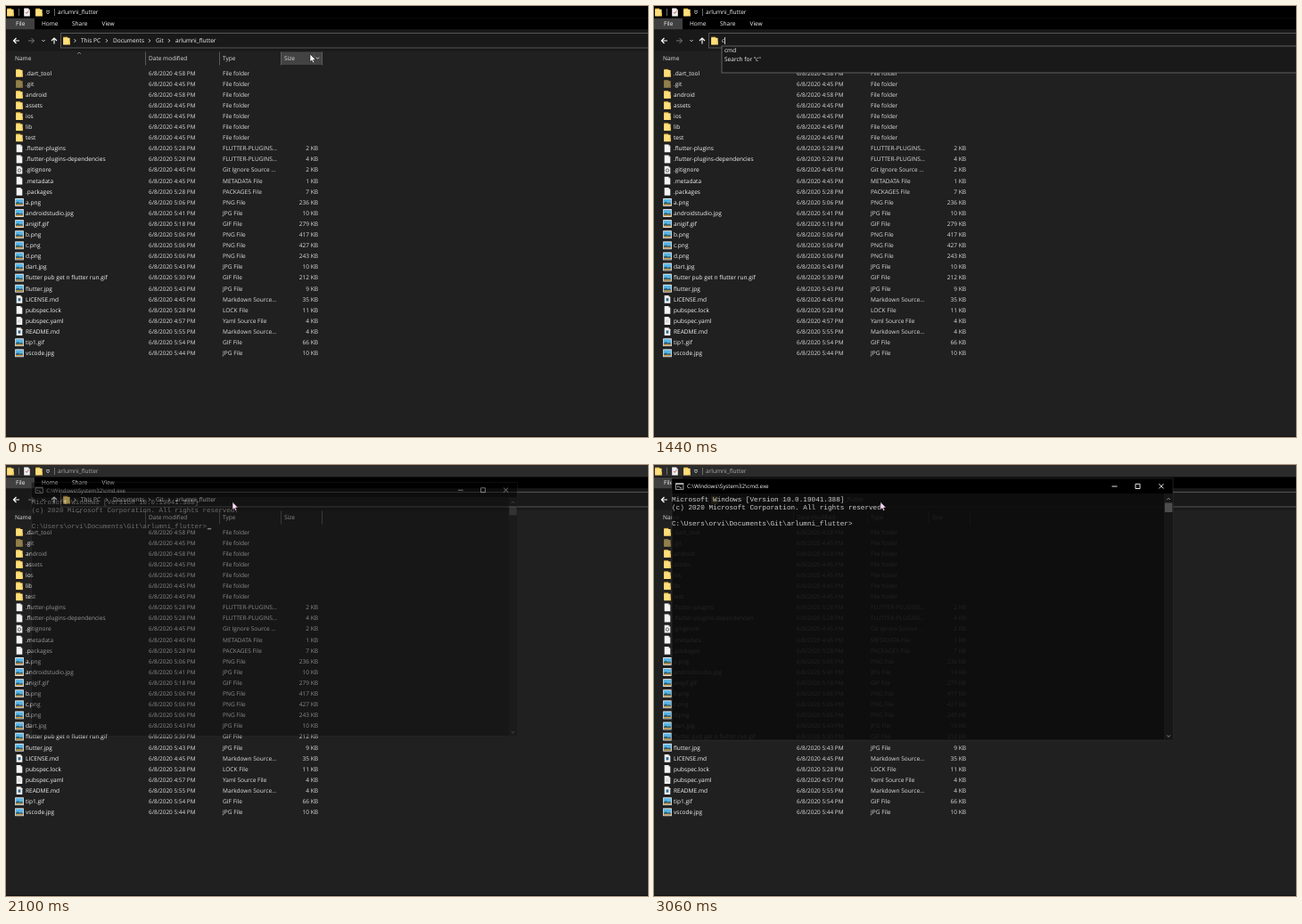
An HTML page for the animation above (3.18 s loop, 720 by 484 pixels).

```html
<!DOCTYPE html>
<html lang="en">
<head>
<meta charset="utf-8">
<title>Open a prompt from the address bar</title>
<style>
  html, body { margin: 0; width: 100%; height: 100%; overflow: hidden; background: #202020; }
  svg { display: block; width: 720px; height: 484px; }
  text { font: 6.55px "Open Sans", "Noto Sans", sans-serif; fill: #f4f4f4; white-space: pre; text-rendering: geometricPrecision; }
  .date { font-size: 6.43px; }
  .head { fill: #dedede; }
  .mono { font: 7.68px "Liberation Mono", "DejaVu Sans Mono", monospace; fill: #ccc; }
  .line { fill: none; stroke: #ddd; stroke-width: .9; }
</style>
</head>
<body>
<svg id="stage" viewBox="0 0 720 484"></svg>
<script>
const LOOP = 3180, TICK = 60;

// Markup helpers; text y is the middle of the capitals.
const rect = (x, y, w, h, fill, extra = '') =>
  `<rect x="${x}" y="${y}" width="${w}" height="${h}" fill="${fill}" ${extra}/>`;
const text = (x, y, str, extra = '') => `<text x="${x}" y="${y + 2.3}" ${extra}>${str}</text>`;
const line = (d, extra = '') => `<path class="line" d="${d}" ${extra}/>`;
const group = (id, body, extra = '') => `<g id="${id}" ${extra}>${body}</g>`;
const chevron = (x, y) => line(`M${x - 1} ${y - 1.8}l1.8 1.8l-1.8 1.8`, 'stroke-width=".7"');
const caretDown = (x, y) => line(`M${x - 1.7} ${y - .9}l1.7 1.7l1.7-1.7`, 'stroke-width=".8"');

const page = (x, y) =>
  `<path d="M${x - 3.3} ${y - 4.4}h4.6l2 2v6.8h-6.6z" fill="#f3f3f3"/>` +
  `<path d="M${x + 1.3} ${y - 4.4}v2h2z" fill="#b4b4b4"/>`;

const icons = {
  folder: (x, y) => rect(x - 3.8, y - 4.3, 5, 8.6, '#e9b83f') +
    rect(x - 3.8, y - 3.2, 7.4, 7.6, '#ffdf7c') + rect(x + 2.3, y + .6, 1.6, 3.8, '#f4c654'),
  hidden: (x, y) => `<g opacity=".5">${icons.folder(x, y)}</g>`,
  page,
  gear: (x, y) => page(x, y) +
    `<circle cx="${x}" cy="${y + .5}" r="1.7" fill="none" stroke="#666" stroke-width="1"/>`,
  mark: (x, y) => page(x, y) + rect(x - 1.4, y - 1.2, 2.8, 3.3, '#2c6b94'),
  code: (x, y) => page(x, y) + line(`M${x - 2} ${y - .5}h3.6M${x - 2} ${y + 1.5}h3.6`, 'style="stroke:#aaa;stroke-width:.6"'),
  image: (x, y) => rect(x - 4.8, y - 4.4, 9.6, 8.8, '#f5f5f5') +
    rect(x - 4, y - 3.5, 8, 7, '#58b5e6') +
    `<path d="M${x - 4} ${y + 3.5}v-2.8l2.5-1.3 2.2 1.5 1.3-.8 2 1v2.4z" fill="#285f70"/>` +
    rect(x - 4, y + 2, 8, 1.5, '#d49a49')
};

// icon | name | time | type | size
const files = `hidden0|.dart_tool|4:58|File folder|
hidden|.git|4:45|File folder|
folder|android|4:58|File folder|
folder|assets|4:45|File folder|
folder|ios|4:45|File folder|
folder|lib|4:45|File folder|
folder|test|4:45|File folder|
page|.flutter-plugins|5:28|FLUTTER-PLUGINS...|2
page|.flutter-plugins-dependencies|5:28|FLUTTER-PLUGINS...|4
gear|.gitignore|4:45|Git Ignore Source ...|2
page|.metadata|4:45|METADATA File|1
page|.packages|5:28|PACKAGES File|7
image|a.png|5:06|PNG File|236
image|androidstudio.jpg|5:41|JPG File|10
image|anigif.gif|5:18|GIF File|279
image|b.png|5:06|PNG File|417
image|c.png|5:06|PNG File|427
image|d.png|5:06|PNG File|243
image|dart.jpg|5:43|JPG File|10
image|flutter pub get n flutter run.gif|5:30|GIF File|212
image|flutter.jpg|5:43|JPG File|9
mark|LICENSE.md|4:45|Markdown Source...|35
page|pubspec.lock|5:28|LOCK File|11
code|pubspec.yaml|4:57|Yaml Source File|4
mark|README.md|5:55|Markdown Source...|4
image|tip1.gif|5:54|GIF File|66
image|vscode.jpg|5:44|JPG File|10`.replace('hidden0', 'folder').split('\n');

const fileRow = (row, i) => {
  const [icon, name, time, type, size] = row.split('|');
  const y = 75.2 + i * 12.1;
  return icons[icon](15, y) + text(22, y, name) +
    text(160, y, `6/8/2020 ${time} PM`, 'class="date head"') + text(243, y, type, 'class="head"') +
    (size && text(350, y, size + ' KB', 'class="head" text-anchor="end"'));
};

const titleBar = rect(0, 0, 720, 13.5, '#000', 'id="bar"') +
  icons.folder(5, 7) + line('M14.5 3v8M54.5 3v8', 'style="stroke:#777"') +
  page(23.5, 7) + line('M22 7l1.3 1.5 2-3', 'style="stroke:#c0504d"') + icons.folder(37, 7) +
  line('M45 5.8h4', 'stroke-width=".8"') + caretDown(47, 8) +
  text(58, 7, 'arlumni_flutter', 'id="title"');

const ribbon = rect(0, 13.5, 720, 13, '#000') + rect(0, 14, 32, 12.5, '#404040') +
  text(11, 20, 'File') + text(40, 20, 'Home') + text(74, 20, 'Share') + text(107.5, 20, 'View');

const navigation = rect(0, 26.5, 720, 24, '#191919') +
  line('M15 39h-6.5m3-3l-3 3l3 3', 'style="stroke:#fff;stroke-width:1.2"') +
  line('M25 39h6.5m-3-3l3 3l-3 3', 'style="stroke:#858585"') + caretDown(42, 39) +
  line('M54 42.5v-6.5m-3 3l3-3l3 3', 'style="stroke:#fff;stroke-width:1.1"') +
  rect(61.5, 30.5, 670, 16.5, '#191919', 'stroke="#555"') + icons.folder(68, 39);

const crumbs = rect(188, 31, 49, 15.5, '#4a4a4a', 'id="crumbHover"') +
  [77.5, 113, 161, 183].map(x => chevron(x, 39)).join('') +
  text(84, 39, 'This PC') + text(120, 39, 'Documents') + text(168, 39, 'Git') + text(190, 39, 'arlumni_flutter');

const path = 'C:\\Users\\orvi\\Documents\\Git\\arlumni_flutter';

const header = group('sizeHover', rect(308, 51.5, 46.5, 14.5, '#434343') +
    line('M345.5 52v14', 'style="stroke:#555"') + caretDown(349.5, 58.5)) +
  line('M156.5 51.5v15M239.5 51.5v15M308.5 51.5v15M354.5 51.5v15', 'style="stroke:#606060"') +
  line('M80 54l2-2l2 2', 'style="stroke:#aaa;stroke-width:.7"') +
  [[10, 'Name'], [160, 'Date modified'], [243, 'Type'], [312, 'Size']]
    .map(([x, str]) => text(x, 59, str, 'class="head"')).join('');

const dropdown = rect(76, 45, 660, 30, '#191919', 'stroke="#606060"') +
  text(79, 49.5, 'cmd') + text(79, 60, '', 'id="search"');

const prompt = rect(20, 15, 562, 17, '#000') + rect(20, 32, 562, 277, '#0c0c0c', 'opacity=".89"') +
  rect(20, 15, 562, 294, 'none', 'stroke="#303030" stroke-width=".7"') +
  rect(24.5, 20.7, 8.4, 6.6, '#000', 'stroke="#ccc" stroke-width=".8"') +
  line('M24.5 21.4h8.4M26 24.5h1.5M28.5 24.2l1 1.6h1.5', 'stroke-width=".8"') +
  text(37, 24, 'C:\\Windows\\System32\\cmd.exe', 'style="font-size:6.25px"') +
  line('M513.5 24h6M540 21.3h5v5.2h-5zM566.3 21.2l5.2 5.2m0-5.2l-5.2 5.2', 'style="stroke:#fff"') +
  rect(572, 32, 10, 277, '#171717') + rect(572.8, 42.5, 8.6, 10.5, '#4d4d4d') +
  line('M575.3 39l1.8-1.8l1.8 1.8M575.3 303.5l1.8 1.8l1.8-1.8', 'style="stroke:#999"') +
  text(20, 38.2, 'Microsoft Windows [Version 10.0.19041.388]', 'class="mono"') +
  text(20, 47.4, '(c) 2020 Microsoft Corporation. All rights reserved.', 'class="mono"') +
  text(20, 66, path + '&gt;', 'class="mono"') + rect(223.5, 68, 4.4, 1.5, '#eee', 'id="block"');

document.getElementById('stage').innerHTML =
  rect(0, 0, 720, 484, '#202020') + titleBar + ribbon + navigation + group('crumbs', crumbs) +
  group('edit', rect(75.5, 34.8, 142.5, 9.4, '#0078d7', 'id="selection"') +
    text(76, 39, '', 'id="address"') + line('M90.3 35v8', 'id="caret" stroke-width=".8"')) +
  header + files.map(fileRow).join('') + rect(0, 483, 720, 1, '#111') +
  group('dropdown', dropdown) + group('prompt', prompt) +
  group('arrow', '<path d="M0 0V8.8L2 7l1.4 3 1.4-.7L3.5 6.4h2.8z" stroke="#000" stroke-width=".5"/>') +
  group('beam', line('M-1.6-4h3.2M-1.6 4h3.2M0-4v8', 'stroke-width=".9"'));

const $ = id => document.getElementById(id);
const show = (id, on) => $(id).setAttribute('opacity', Number(on));

// Interpolates rows of [time, ...values].
function track(rows, t) {
  const next = rows.findIndex(row => row[0] > t);
  if (next === 0) return rows[0].slice(1);
  if (next < 0) return rows[rows.length - 1].slice(1);
  const a = rows[next - 1], b = rows[next], k = (t - a[0]) / (b[0] - a[0]);
  return a.slice(1).map((v, i) => v + (b[i + 1] - v) * k);
}

const pointer = [[0, 341, 54], [60, 336, 53], [180, 285, 48], [300, 215, 40], [360, 196, 37],
  [420, 191, 36], [480, 220, 39], [540, 251, 41], [720, 255, 43], [960, 260, 47],
  [1860, 260, 47], [1980, 254, 41.5]];
const crumbGlow = [[240, 0], [360, 1], [540, 1], [600, .6]];
const sizeGlow = [[60, 1], [240, 0]];
const opening = [[1980, 0, .945], [2040, .18, .956], [2100, .45, .969], [2160, .74, .983],
  [2220, .92, .992], [2280, .97, .996], [2400, 1, 1]];
const typing = [[1380, 'c'], [1500, 'cm'], [1620, 'cmd']];

function draw(t) {
  const editing = t >= 660 && t < 1860;
  const typed = typing.filter(([at]) => at <= t).map(([, str]) => str).pop();
  const inactive = t >= 2040;

  $('bar').setAttribute('fill', inactive ? '#2b2b2b' : '#000');
  $('title').style.fill = inactive ? '#aaa' : '#f4f4f4';
  show('crumbs', !editing);
  show('crumbHover', t < 660 ? track(crumbGlow, t)[0] : 0);
  show('sizeHover', track(sizeGlow, t)[0]);

  show('edit', editing);
  show('selection', !typed);
  show('caret', !!typed);
  $('address').textContent = typed || path;
  if (typed) {
    const x = 76.4 + $('address').getComputedTextLength();
    $('caret').setAttribute('d', `M${x} 35v8`);
    $('search').textContent = `Search for "${typed}"`;
  }
  show('dropdown', t >= 1440 && t < 1800);

  const [alpha, scale] = track(opening, t);
  show('prompt', alpha);
  $('prompt').setAttribute('transform', `translate(301 162) scale(${scale}) translate(-301 -162)`);
  show('block', t < 3000);

  const [x, y] = track(pointer, t);
  for (const id of ['arrow', 'beam']) $(id).setAttribute('transform', `translate(${x} ${y})`);
  $('arrow').setAttribute('fill', t < 60 ? '#fff' : '#ffdcf8');
  show('arrow', t < 720 || t >= 1920);
  show('beam', t >= 720 && t < 1380);
}

const start = performance.now();
function frame() {
  const t = (performance.now() - start) % LOOP;
  draw(Math.floor(t / TICK) * TICK);
  requestAnimationFrame(frame);
}
frame();
</script>
</body>
</html>
```
